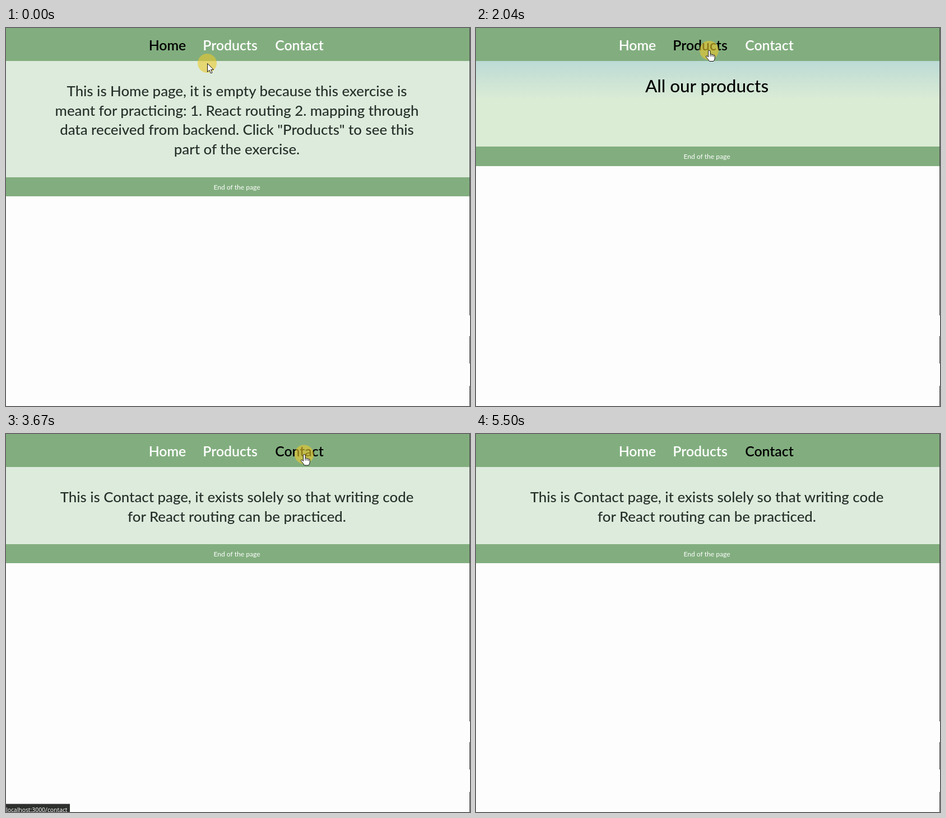
Recreate the animation shown at these times as an HTML page. Size 828 by 676 pixels, loop 5.54 s.

```html
<!DOCTYPE html>
<html lang="en">
<head>
<meta charset="utf-8">
<title>Routing exercise</title>
<style>
  html, body { margin: 0; width: 100%; height: 100%; overflow: hidden; background: #fdfdfd; }
  svg { display: block; width: 100vw; height: 100vh; font-family: Lato, "Open Sans", sans-serif; }
  .nav { font-size: 24.8px; font-weight: 600; text-anchor: middle; }
  .lead { font-size: 25.8px; font-weight: 500; text-anchor: middle; fill: #26302a; }
  .head { font-size: 31.4px; font-weight: 500; text-anchor: middle; }
  .end { font-size: 12.1px; text-anchor: middle; fill: #fff; }
  .title { font-size: 16.1px; font-weight: 600; fill: #262626; }
  .rating { font-size: 12.2px; fill: #3c3c3c; }
  .desc { font-size: 13.8px; fill: #3c3c3c; }
  .status { font-family: "Open Sans", "Noto Sans", sans-serif; font-size: 10.4px; fill: #fff; }
  .card { fill: #fdfdfd; stroke: #b9beb2; filter: drop-shadow(3px 3px 2.5px rgba(60, 70, 60, .6)); }
</style>
</head>
<body>
<svg id="stage" viewBox="0 0 828 676" preserveAspectRatio="none">
  <defs>
    <linearGradient id="sky" gradientUnits="userSpaceOnUse" x1="0" y1="59" x2="0" y2="128">
      <stop offset="0" stop-color="#bcdad5"/>
      <stop offset="1" stop-color="#dbecd5"/>
    </linearGradient>
  </defs>
  <rect width="828" height="676" fill="#fdfdfd"/>
  <g id="pages"></g>
  <rect width="828" height="59" fill="#82ae7f"/>
  <g id="nav"></g>
  <g id="scrollbar">
    <rect x="811" width="17" height="676" fill="#f0f0f0"/>
    <rect x="811" y="14" width="16" height="133" fill="#cbcbce"/>
    <path d="M815 10l4-4 4 4M815 670l4 4 4-4" fill="none" stroke="#505050" stroke-width="1.7"/>
  </g>
  <path d="M827.5 0V514M827.5 551V600M827.5 640V676" stroke="#4a4d4a"/>
  <g id="status">
    <rect y="661.5" height="15" fill="#2d302d"/>
    <text class="status" y="675.5"></text>
  </g>
  <g id="pointer">
    <circle r="17" fill="#ecca2c" opacity=".6"/>
    <circle id="ripple" fill="none" stroke="#ef4b3c" stroke-width="4"/>
    <path id="arrow" d="M.5 .5V15.5L4 12.3 6.4 18 9 16.9 6.6 11.4H11.3Z" fill="#fff" stroke="#111"/>
    <path id="hand" d="M-1.5 12V2Q-1.5 0 .3 0 2 0 2 2V7Q3.5 5.8 5 7.6 6.7 6.6 7.8 8.4 10 7.6 10.2 10V14Q10 17 8 19.5H.5Q-1 16.5-5 12.2-6.3 10.5-5 9.8-3.5 9.3-1.5 12ZM2 7V11M5 8V11M7.8 9V11.5"
      fill="#fff" stroke="#111" stroke-linejoin="round"/>
  </g>
</svg>
<script>
const LOOP = 5540;
const LINKS = [["Home", 288], ["Products", 400], ["Contact", 523.5]];
const LEADS = {
  home: ["This is Home page, it is empty because this exercise is",
    "meant for practicing: 1. React routing 2. mapping through",
    'data received from backend. Click "Products" to see this',
    "part of the exercise."],
  contact: ["This is Contact page, it exists solely so that writing code",
    "for React routing can be practiced."]
};
const PRODUCTS = [
  ["Zelvor 9", 4.69, 549, "An olive mobile which is|nothing like olive"],
  ["Zelvor X", 4.44, 899, "SIM-Free, Model B40732 6.5-|inch Super Lumora HD display|with OLED technology V38|Zephic chip with ..."],
  ["Belvoro Cascade 9", 4.09, 1249, "Belvoro's new variant which|goes beyond Meadow to the|Cascade"],
  ["VUNNK42", 4.3, 280, "VUNN K42 is officially|announced on April 2021."],
  ["Quorlen T50", 4.09, 499, "Quorlen\u2019s re-badged T50 Pro|New Edition was officially|unveiled yesterday in Germany|and now the device has made|its way to the UK."],
  ["Tarnlid Neo", 4.57, 1749, "Tarnlid Neo 2021 with mini-|LED display may launch|between September, November"]
];
// Pointer path: time, x, y
const PATH = [
  [90, 359, 63], [590, 399, 32], [1340, 399, 32], [1750, 398, 36], [1900, 398, 36],
  [2040, 416, 40], [2460, 504, 39], [2680, 532, 36.5], [4250, 532, 36.5], [4540, 560, -40]
];
const CLICKS = [750, 2700];
const CLICK_TIME = 430;

const $ = id => document.getElementById(id);
const text = (cls, x, y, s) => `<text class="${cls}" x="${x}" y="${y}">${s}</text>`;
const show = (el, on) => el.setAttribute("display", on ? "inline" : "none");
const clamp = v => Math.max(0, Math.min(1, v));

function footer(y, h) {
  return `<rect y="${y}" width="828" height="${h}" fill="#82ae7f"/>` + text("end", 412, y + 22, "End of the page");
}

function leadPage(lines, bottom) {
  return `<rect y="59" width="828" height="${bottom - 59}" fill="#ddebdc"/>` +
    lines.map((s, i) => text("lead", 412, 122 + i * 34.7, s)).join("") + footer(bottom, 34);
}

function card([name, rating, price, desc], i) {
  const x = 43 + i % 3 * 252.2, y = 169 + Math.floor(i / 3) * 292.2, tx = x + 13;
  const lines = desc.split("|");
  return `<rect class="card" x="${x + .5}" y="${y + .5}" width="217.5" height="261" rx="8"/>` +
    text("title", tx, y + 31, name) +
    text("rating", tx, y + 56, "rating: " + rating) +
    lines.map((s, k) => text("desc", tx, y + 82 + k * 20.2, s)).join("") +
    text("desc", tx, y + 89.2 + lines.length * 20.2, "Price: $" + price);
}

function productPage(loaded) {
  const bottom = loaded ? 676 : 212;
  return `<rect y="59" width="828" height="${bottom - 59}" fill="url(#sky)"/>` +
    text("head", loaded ? 404 : 412, 115, "All our products") +
    (loaded ? PRODUCTS.map(card).join("") : footer(bottom, 35));
}

// Each page: start time, active link, markup
const PAGES = [
  [0, 0, leadPage(LEADS.home, 267)],
  [1920, 1, productPage(false)],
  [2200, 1, productPage(true)],
  [3660, 2, leadPage(LEADS.contact, 197)]
];
$("pages").innerHTML = PAGES.map(p => `<g>${p[2]}</g>`).join("");
$("nav").innerHTML = LINKS.map(([s, x]) => text("nav", x, 40, s)).join("");
const [statusBox, statusText] = $("status").children;

function position(t) {
  const i = PATH.findIndex(p => p[0] > t);
  if (i === 0) return PATH[0].slice(1);
  if (i < 0) return PATH[PATH.length - 1].slice(1);
  const a = PATH[i - 1], b = PATH[i], k = (t - a[0]) / (b[0] - a[0]);
  const e = k * k * (3 - 2 * k);
  return [a[1] + (b[1] - a[1]) * e, a[2] + (b[2] - a[2]) * e];
}

function drawStatus(t) {
  const first = t < 2500;
  const alpha = first
    ? clamp((t - 1420) / 120) * clamp((2020 - t) / 100)
    : clamp((t - 3420) / 120) * clamp((3950 - t) / 200);
  statusText.textContent = "localhost:3000/" + (first ? "products" : "contact");
  statusBox.setAttribute("width", first ? 120.5 : 114);
  $("status").setAttribute("opacity", alpha);
}

function drawPointer(t) {
  const [x, y] = position(t);
  const overLink = y > 16 && y < 46 && (x > 350 && x < 450 || x > 470 && x < 570);
  $("pointer").setAttribute("transform", `translate(${x} ${y})`);
  show($("pointer"), t < 4540);
  show($("hand"), overLink);
  show($("arrow"), !overLink);
  const click = CLICKS.find(c => t >= c && t < c + CLICK_TIME);
  show($("ripple"), click !== undefined);
  if (click !== undefined) {
    const p = (t - click) / CLICK_TIME;
    $("ripple").setAttribute("r", 2.5 + 13 * p);
    $("ripple").setAttribute("opacity", .85 - .65 * p);
  }
}

function draw(t) {
  let now = 0;
  PAGES.forEach((p, i) => { if (t >= p[0]) now = i; });
  [...$("pages").children].forEach((g, i) => show(g, i === now));
  [...$("nav").children].forEach((el, i) => el.setAttribute("fill", i === PAGES[now][1] ? "#000" : "#fff"));
  $("nav").setAttribute("transform", `translate(${now === 2 ? -8 : 0} 0)`);
  show($("scrollbar"), now === 2);
  drawStatus(t);
  drawPointer(t);
}

let start;
function tick(time) {
  start ??= time;
  draw((time - start) % LOOP);
  requestAnimationFrame(tick);
}
draw(0);
requestAnimationFrame(tick);
</script>
</body>
</html>
```
